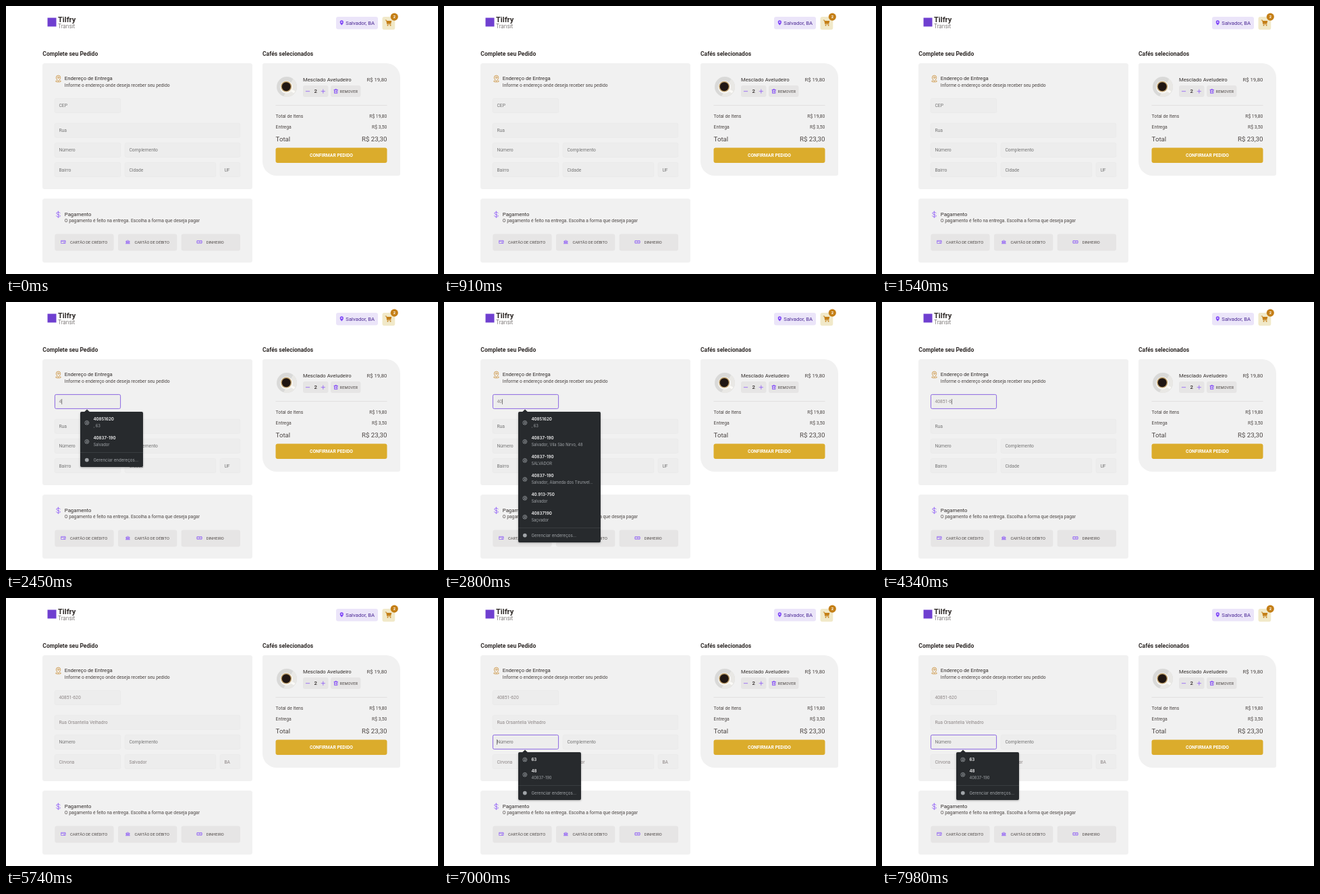
Animation, 640 px wide and 398 px high, one loop 8000 ms. Source, as an HTML page with a canvas:

```html
<!DOCTYPE html>
<html lang="pt-BR">
<head>
<meta charset="utf-8">
<title>Complete seu Pedido</title>
<style>
html, body { margin: 0; width: 100%; height: 100%; overflow: hidden; background: #fff; }
canvas { display: block; width: 100vw; height: 100vh; }
</style>
</head>
<body>
<canvas id="stage"></canvas>
<script>
const W = 640, H = 398, LOOP = 8000;
const canvas = document.getElementById('stage');
const ctx = canvas.getContext('2d');
const ratio = window.devicePixelRatio || 1;
canvas.width = W * ratio;
canvas.height = H * ratio;

const INK = '#302b29', BODY = '#4b4543', MUTED = '#8d8686', HINT = '#757575';
const PURPLE = '#8047f8', VIOLET = '#4b2995', GOLD = '#c47f17', YELLOW = '#dbac2c';
const CARD = '#f1f1f1', BUTTON = '#e6e5e5';
const ROBOTO = 'Roboto, sans-serif', INTER = 'Inter, sans-serif';
const L = 7.74, M = 6.77, S = 5.81;

// y is the middle of the capital letters
function text(str, x, y, size, color, { weight = 400, align = 'left', font = ROBOTO } = {}) {
  ctx.font = `${weight} ${size}px ${font}`;
  ctx.textAlign = align;
  ctx.fillStyle = color;
  ctx.fillText(str, x, y + size * 0.356);
}

function box(x, y, w, h, r, fill, stroke) {
  ctx.beginPath();
  ctx.roundRect(x, y, w, h, r);
  if (fill) { ctx.fillStyle = fill; ctx.fill(); }
  if (stroke) { ctx.strokeStyle = stroke; ctx.lineWidth = 0.9; ctx.stroke(); }
}

function disc(x, y, r, fill) {
  ctx.beginPath();
  ctx.arc(x, y, r, 0, Math.PI * 2);
  ctx.fillStyle = fill;
  ctx.fill();
}

function lines(path, x, y, color, width = 0.7) {
  ctx.save();
  ctx.translate(x, y);
  ctx.strokeStyle = color;
  ctx.lineWidth = width;
  ctx.lineCap = ctx.lineJoin = 'round';
  ctx.stroke(path);
  ctx.restore();
}

function shape(path, x, y, color) {
  ctx.save();
  ctx.translate(x, y);
  ctx.fillStyle = color;
  ctx.fill(path, 'evenodd');
  ctx.restore();
}

const icons = {
  pin: new Path2D('M0 3.6C-1.3 2.2-2.6.8-2.6-1A2.6 2.6 0 0 1 2.6-1C2.6.8 1.3 2.2 0 3.6ZM1-1A1 1 0 1 0-1-1A1 1 0 1 0 1-1Z'),
  place: new Path2D('M0 3.6C-1.6 2.1-3.2.5-3.2-1.5A3.2 3.2 0 0 1 3.2-1.5C3.2.5 1.6 2.1 0 3.6ZM1.2-1.5A1.2 1.2 0 1 0-1.2-1.5A1.2 1.2 0 1 0 1.2-1.5ZM-2.2 3C-4 3.3-4.3 4.1-3.4 4.5C-1.8 5.2 1.8 5.2 3.4 4.5C4.3 4.1 4 3.3 2.2 3'),
  dollar: new Path2D('M0-4.8V4.8M2.7-1.9C2.5-4-2.7-4.1-2.7-1.8C-2.7.4 3 .1 3 2.1C3 4.1-3 4.1-3 1.9'),
  card: new Path2D('M-3-2.1H3V2.1H-3ZM-3-.8H3M.4 1H2'),
  bank: new Path2D('M-2.8-.7L0-2.5L2.8-.7ZM-1.9-.5V1.5M-.6-.5V1.5M.6-.5V1.5M1.9-.5V1.5M-2.6 1.6H2.6M-3 2.4H3'),
  cash: new Path2D('M-3.4-1.8H3.4V1.8H-3.4ZM1 0A1 1 0 1 0-1 0A1 1 0 1 0 1 0M-3.4-.5L-2.1-1.8M3.4-.5L2.1-1.8M-3.4.5L-2.1 1.8M3.4.5L2.1 1.8'),
  trash: new Path2D('M-2.8-2H2.8M-1.1-2V-3H1.1V-2M-2.2-2V3H2.2V-2M-.8-.5V1.5M.8-.5V1.5'),
  minus: new Path2D('M-2.7 0H2.7'),
  plus: new Path2D('M-2.7 0H2.7M0-2.7V2.7'),
  cart: new Path2D('M-4.6-4H-3.2L-2 2H3.2'),
  basket: new Path2D('M-3.2-3H4.5L3.5 1.3H-2.3Z'),
  user: new Path2D('M3 0A3 3 0 1 0-3 0A3 3 0 1 0 3 0M1.1-.5A1.1 1.1 0 1 0-1.1-.5A1.1 1.1 0 1 0 1.1-.5M-1.9 2.2C-1.2.8 1.2.8 1.9 2.2')
};

function header() {
  box(61.5, 17.5, 13, 13, 0, '#6f3fd0');
  text('Tilfry', 77, 19.6, 11, INK, { weight: 700 });
  text('Transit', 77, 29.8, 8.4, BODY, { weight: 300 });
  box(489, 16, 62, 18.5, 3, '#ebe5f9');
  shape(icons.pin, 497.3, 24.9, PURPLE);
  text('Salvador, BA', 503.3, 25.3, L, VIOLET);
  box(557.5, 16, 18.8, 19.2, 3, '#f1e9c9');
  lines(icons.cart, 566.8, 25, GOLD, 0.9);
  shape(icons.basket, 566.8, 25, GOLD);
  disc(565.5, 28.7, 0.9, GOLD);
  disc(569.6, 28.7, 0.9, GOLD);
  disc(575.3, 16.1, 5.6, GOLD);
  text('2', 575.3, 16.2, S, '#fff', { weight: 700, align: 'center' });
}

function field(x, y, w, hint, value, focused) {
  if (focused) box(x + 0.4, y + 0.4, w - 0.8, 21, 2, '#ededed', '#8158e0');
  else box(x + 0.3, y + 0.3, w - 0.6, 21.2, 2, '#ededed', '#eaeaea');
  text(value || hint, x + 6.4, y + 11, M, value ? MUTED : HINT);
}

function caret(x, y) {
  ctx.fillStyle = '#555';
  ctx.fillRect(x, y - 4, 0.7, 8);
}

function addressCard(state, blinkOn) {
  const { cep, filled, focus } = state;
  const fill = s => filled ? s : '';
  box(54, 85, 311, 187, 3.5, CARD);
  lines(icons.place, 77.5, 107.8, GOLD);
  text('Endereço de Entrega', 86.8, 107.1, L, INK);
  text('Informe o endereço onde deseja receber seu pedido', 86.8, 117.3, M, BODY);
  field(72, 137, 98, 'CEP', cep, focus === 'cep');
  field(72, 173.7, 275, 'Rua', fill('Rua Orsantelia Velhadro'));
  field(72, 203, 98, 'Número', '', focus === 'num');
  field(176, 203, 171, 'Complemento');
  field(72, 232.2, 98, 'Bairro', fill('Cirvona'));
  field(176, 232.2, 135, 'Cidade', fill('Salvador'));
  field(317, 232.2, 30, 'UF', fill('BA'));
  if (focus && blinkOn) {
    ctx.font = `${M}px ${ROBOTO}`;
    if (focus === 'cep') caret(78.6 + ctx.measureText(cep).width, 148);
    else caret(78.2, 214);
  }
}

function paymentCard() {
  box(54, 286, 311, 95, 3.5, CARD);
  lines(icons.dollar, 77.4, 309.6, PURPLE);
  text('Pagamento', 86.8, 308.8, L, INK);
  text('O pagamento é feito na entrega. Escolha a forma que deseja pagar', 86.8, 318.6, M, BODY);
  [[72.3, 'card', 'CARTÃO DE CRÉDITO', 12.7, 22.7],
   [166, 'bank', 'CARTÃO DE DÉBITO', 14.4, 24.5],
   [259.7, 'cash', 'DINHEIRO', 27, 37]].forEach(([x, icon, label, ix, tx]) => {
    box(x, 338.5, 87.3, 25, 3, BUTTON);
    lines(icons[icon], x + ix, 350.4, PURPLE, 0.6);
    text(label, x + tx, 350.6, S, BODY);
  });
}

function coffee(x, y) {
  disc(x, y, 15, '#d9d9d8');
  ctx.beginPath();
  ctx.arc(x, y, 15, -0.9, 1.9);
  ctx.fillStyle = '#e9e8e5';
  ctx.fill();
  ctx.beginPath();
  ctx.moveTo(x + 6, y + 5);
  ctx.lineTo(x + 11.5, y + 8);
  ctx.strokeStyle = '#fbfaf7';
  ctx.lineWidth = 3.5;
  ctx.stroke();
  disc(x - 0.5, y + 0.5, 9.6, '#f7f5f0');
  disc(x - 0.8, y - 0.3, 7.9, '#b99a67');
  disc(x - 0.8, y - 0.3, 6.5, '#201612');
}

function orderCard() {
  const right = { align: 'right' };
  box(380, 85, 204, 167, [3, 21, 3, 21], CARD);
  coffee(416, 120);
  text('Mesclado Aveludeiro', 440, 108.8, L, INK);
  text('R$ 19,80', 564.4, 108.8, L, BODY, right);
  box(440, 118, 37.5, 17, 3, BUTTON);
  lines(icons.minus, 447, 126.7, PURPLE);
  text('2', 458.6, 126.6, L, INK, { weight: 500, align: 'center' });
  lines(icons.plus, 469.8, 126.7, PURPLE);
  box(481, 118, 44.5, 17, 3, BUTTON);
  lines(icons.trash, 488.7, 126.6, PURPLE, 0.8);
  text('REMOVER', 494.6, 126.6, S, BODY);
  ctx.fillStyle = '#dedddd';
  ctx.fillRect(399.5, 147, 165, 0.8);
  [['Total de Itens', 'R$ 19,80', 163.7, M], ['Entrega', 'R$ 3,50', 179.8, M], ['Total', 'R$ 23,30', 197.8, 9.68]]
    .forEach(([label, price, y, size]) => {
      text(label, 399.6, y, size, BODY);
      text(price, 564.4, y, size, BODY, right);
    });
  box(399.5, 210.6, 165, 22.4, 3, YELLOW);
  text('CONFIRMAR PEDIDO', 482, 222, M, '#fff', { weight: 700, align: 'center' });
}

const saved = [
  ['40851620', ', 63'],
  ['40837-190', 'Salvador, Vila São Nirvo, 48'],
  ['40837-190', 'SALVADOR'],
  ['40837-190', 'Salvador, Alameda dos Tirunvel...'],
  ['40.913-750', 'Salvador'],
  ['40837190', 'Saçvador']
];
const menus = {
  short: { top: 163, w: 93, items: [saved[0], ['40837-190', 'Salvador']] },
  full: { top: 163, w: 122, items: saved },
  fewer: { top: 163, w: 122, items: saved.filter(s => s[0].startsWith('408')) },
  single: { top: 163, w: 93, items: [saved[0]] },
  num: { top: 229, w: 93, items: [['63'], ['48', '40837-190']] }
};

function popup({ top, w, items }) {
  const x = 110, rowH = item => item[1] ? 28 : 17;
  const h = items.reduce((sum, item) => sum + rowH(item), 26);
  const dark = '#272a2d', grey = '#a0a4a8', font = INTER;
  ctx.save();
  ctx.shadowColor = 'rgba(0,0,0,.3)';
  ctx.shadowBlur = 3 * ratio;
  ctx.shadowOffsetY = ratio;
  box(x, top, w, h, 2, dark);
  ctx.restore();
  shape(new Path2D('M-4 0L0-3.7L4 0Z'), 120, top + 0.2, dark);
  let y = top;
  for (const item of items) {
    lines(icons.user, 119.8, y + (item[1] ? 16.3 : 11), grey, 0.7);
    text(item[0], 129.4, y + 11, 6.2, '#f4f4f5', { weight: 600, font });
    if (item[1]) text(item[1], 129.4, y + 21.3, 5.8, grey, { font });
    y += rowH(item);
  }
  ctx.fillStyle = '#414548';
  ctx.fillRect(x, y + 4, w, 0.7);
  disc(119.8, y + 15.6, 2.9, grey);
  text('Gerenciar endereços...', 129.4, y + 15.6, 6.2, grey, { font });
}

// start, typed code, focused field, open menu, address filled
const steps = [
  [0, ''],
  [1820, '', 'cep', 'short'],
  [2450, '4', 'cep', 'short'],
  [2590, '4', 'cep', 'full'],
  [2800, '40', 'cep', 'full'],
  [3570, '408', 'cep', 'fewer'],
  [3780, '4085', 'cep', 'single'],
  [3990, '40851', 'cep', 'single'],
  [4340, '40851-6', 'cep'],
  [4550, '40851-62', 'cep'],
  [4830, '40851-620', 'cep'],
  [5110, '40851-620'],
  [5320, '40851-620', '', '', true],
  [7000, '40851-620', 'num', 'num', true]
].map(([at, cep, focus, menu, filled]) => ({ at, cep, focus, menu, filled }));

function draw(now) {
  const t = now % LOOP;
  const state = steps.findLast(s => s.at <= t);
  const blinkOn = (t - state.at) % 1000 < 500;
  ctx.setTransform(ratio, 0, 0, ratio, 0, 0);
  ctx.fillStyle = '#fff';
  ctx.fillRect(0, 0, W, H);
  header();
  text('Complete seu Pedido', 54.3, 71, 8.55, INK, { weight: 700 });
  text('Cafés selecionados', 380, 71, 8.55, INK, { weight: 700 });
  addressCard(state, blinkOn);
  paymentCard();
  orderCard();
  if (state.menu) popup(menus[state.menu]);
}

const start = performance.now();
function frame() {
  draw(performance.now() - start);
  requestAnimationFrame(frame);
}
frame();
</script>
</body>
</html>
```
